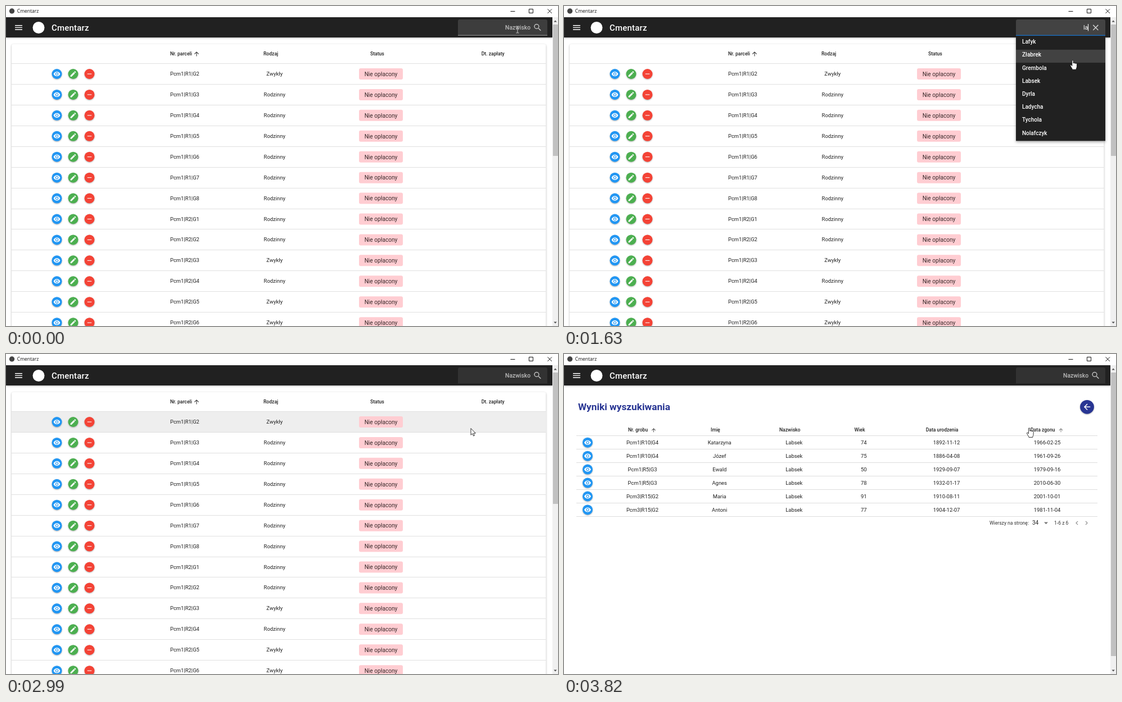
These frames come from a looping animation (982 by 570 pixels, 4430 ms). An HTML page:

```html
<!DOCTYPE html>
<html lang="pl">
<head>
<meta charset="utf-8">
<title>Cmentarz</title>
<style>
html, body { margin: 0; width: 100%; height: 100%; overflow: hidden; background: #fff; }
svg { display: block; }
text { font-family: Roboto, sans-serif; white-space: pre; }
.cell { font-size: 9.45px; fill: #212121; }
.head { font-size: 8.6px; font-weight: 500; fill: #212121; }
.chip { font-size: 10.15px; fill: #37292a; }
.item { font-size: 10px; font-weight: 500; fill: #fff; }
.foot { font-size: 8.6px; fill: #333; }
.lift { filter: drop-shadow(0 1.2px 1px rgba(0,0,0,.3)); }
</style>
</head>
<body>
<svg id="stage" width="982" height="570" viewBox="0 0 982 570"></svg>
<script>
const LOOP = 4430;
const stage = document.getElementById('stage');

const ICON = {
  eye: 'M12 9a3 3 0 1 0 0 6a3 3 0 1 0 0-6M12 17a5 5 0 1 1 0-10a5 5 0 1 1 0 10M12 4.5C7 4.5 2.73 7.61 1 12c1.73 4.39 6 7.5 11 7.5s9.27-3.11 11-7.5C21.27 7.61 17 4.5 12 4.5Z',
  pencil: 'M20.7 7c.4-.4.4-1 0-1.4l-2.3-2.3c-.4-.4-1-.4-1.4 0l-1.9 1.8l3.8 3.8M3 17.25V21h3.75L17.8 9.93l-3.75-3.75Z',
  minus: 'M5 11h14v2H5Z',
  search: 'M9.5 3a6.5 6.5 0 0 1 4.94 10.73l.27.27h.79l5 5l-1.5 1.5l-5-5v-.79l-.27-.27A6.5 6.5 0 1 1 9.5 3m0 2a4.5 4.5 0 1 0 0 9a4.5 4.5 0 1 0 0-9Z',
  close: 'M19 6.41L17.59 5L12 10.59L6.41 5L5 6.41L10.59 12L5 17.59L6.41 19L12 13.41L17.59 19L19 17.59L13.41 12Z',
  left: 'M20 11v2H8l5.5 5.5l-1.42 1.42L4.16 12l7.92-7.92L13.5 5.5L8 11Z',
  up: 'M13 20h-2V8l-5.5 5.5l-1.42-1.42L12 4.16l7.92 7.92l-1.42 1.42L13 8Z',
  menu: 'M3 6h18v2H3ZM3 11h18v2H3ZM3 16h18v2H3Z',
  down: 'M7 10l5 5l5-5Z',
  prev: 'M15.4 16.6L10.8 12l4.6-4.6L14 6l-6 6l6 6Z',
  next: 'M8.6 16.6L13.2 12L8.6 7.4L10 6l6 6l-6 6Z'
};

function el(parent, tag, attrs = {}, body) {
  const node = document.createElementNS('http://www.w3.org/2000/svg', tag);
  for (const k in attrs) node.setAttribute(k, attrs[k]);
  if (body !== undefined) node.textContent = body;
  parent.append(node);
  return node;
}
const set = (node, k, v) => node.setAttribute(k, v);
const show = (node, on) => set(node, 'visibility', on ? 'visible' : 'hidden');
const group = parent => el(parent, 'g');
const rect = (p, x, y, width, height, fill, rx = 0) => el(p, 'rect', { x, y, width, height, fill, rx });
const disc = (p, cx, cy, r, fill) => el(p, 'circle', { cx, cy, r, fill });
const line = (p, d, stroke, w = 1) => el(p, 'path', { d, stroke, 'stroke-width': w, fill: 'none' });
const text = (p, s, x, mid, cls, anchor = 'start', extra = {}) =>
  el(p, 'text', { x, y: mid, class: cls, 'text-anchor': anchor, ...extra }, s);
const icon = (p, name, cx, cy, size, fill) => el(p, 'path', {
  d: ICON[name], fill, 'fill-rule': 'evenodd',
  transform: `translate(${cx - size / 2} ${cy - size / 2}) scale(${size / 24})`
});
function button(p, name, cx, cy, fill, r = 9, size = 13) {
  set(disc(p, cx, cy, r, fill), 'class', 'lift');
  icon(p, name, cx, cy, size, '#fff');
}

rect(stage, 0, 0, 982, 570, '#fff');

// Plot table
const table = group(stage);
const card = rect(table, 10, 68, 950.5, 520, '#fff', 3);
card.style.filter = 'drop-shadow(0 1px 1.6px rgba(0,0,0,.32))';
const rowHover = rect(table, 10, 103, 950.5, 36.5, '#eee');
[['Nr. parceli', 292], ['Rodzaj', 458], ['Status', 648], ['Dt. zapłaty', 845.7]]
  .forEach(([s, x]) => text(table, s, x, 87.7, 'head'));
icon(table, 'up', 339, 85.3, 12.5, '#333');
const PITCH = 36.93, PLAIN = [0, 9, 11, 12];
for (let i = 0; i < 13; i++) {
  const y = 121 + PITCH * i;
  const plot = i < 7 ? `Pcm1|R1|G${i + 2}` : `Pcm1|R2|G${i - 6}`;
  rect(table, 10, Math.round(y - 19), 950.5, 1, '#e0e0e0');
  button(table, 'eye', 90.5, y, '#2196f3');
  button(table, 'pencil', 119.5, y, '#4caf50');
  button(table, 'minus', 148.5, y, '#f44336');
  text(table, plot, 292, y + 3, 'cell');
  text(table, PLAIN.includes(i) ? 'Zwykły' : 'Rodzinny', 477.8, y + 3, 'cell', 'middle');
  rect(table, 628, y - 10, 78, 20, '#ffcdd2', 3);
  text(table, 'Nie opłacony', 667, y + 3.8, 'chip', 'middle');
}

// Search results
const results = group(stage);
text(results, 'Wyniki wyszukiwania', 25, 100, '', 'start', { 'font-size': 17.25, 'font-weight': 700, fill: '#283593' });
button(results, 'left', 930.5, 94.3, '#283593', 12.4, 17.25);
[['Nr. grobu', 114], ['Imię', 261], ['Nazwisko', 383], ['Wiek', 516.5], ['Data urodzenia', 643.7], ['Data zgonu', 830]]
  .forEach(([s, x]) => text(results, s, x, 138.4, 'head'));
icon(results, 'up', 159.5, 135.8, 10.5, '#444');
icon(results, 'up', 884, 135.8, 10.5, '#777');
const FOUND = [
  'Pcm1|R10|G4 Katarzyna 74 1892-11-12 1966-02-25',
  'Pcm1|R10|G4 Józef 75 1886-04-08 1961-09-26',
  'Pcm1|R5|G3 Ewald 50 1929-09-07 1979-09-16',
  'Pcm1|R5|G3 Agnes 78 1932-01-17 2010-06-30',
  'Pcm3|R15|G2 Maria 91 1910-08-11 2001-10-01',
  'Pcm3|R15|G2 Antoni 77 1904-12-07 1981-11-04'
];
rect(results, 22, 145, 927, 1, '#ddd');
FOUND.forEach((row, i) => {
  const y = 157.7 + 23.95 * i;
  const cells = row.split(' ');
  cells.splice(2, 0, 'Labsek');
  rect(results, 22, Math.round(y + 11.6), 927, 1, '#ddd');
  button(results, 'eye', 42, y, '#2196f3');
  [139.5, 276.7, 409.3, 533.3, 680.6, 859.6].forEach((x, c) => text(results, cells[c], x, y + 3.2, 'cell', 'middle'));
});
text(results, 'Wierszy na stronę:', 757, 304, 'foot');
text(results, '34', 833, 304.3, 'cell', 'start', { style: 'font-size:10px' });
icon(results, 'down', 857.5, 301, 17, '#777');
text(results, '1-6 z 6', 872, 304, 'foot');
icon(results, 'prev', 912.5, 301, 14, '#888');
icon(results, 'next', 929.5, 301, 14, '#888');

// Window frame and app bar
rect(stage, 0, 0, 982, 20, '#fff');
disc(stage, 10.5, 9, 4.7, '#444');
text(stage, 'Cmentarz', 19.8, 12.3, '', 'start', { style: 'font:8.5px "Open Sans",sans-serif', fill: '#111' });
line(stage, 'M897.5 9.5h8M930.5 5.5h7v7h-7ZM963.5 5.5l7.5 7.5M971 5.5l-7.5 7.5', '#111');
const bar = rect(stage, 0, 20, 972, 36, '#212121');
bar.style.filter = 'drop-shadow(0 1px 1.5px rgba(0,0,0,.3))';
rect(stage, 0, 18, 982, 2, '#fff');
icon(stage, 'menu', 22.5, 38.4, 17.25, '#fff');
disc(stage, 58, 38.5, 10.5, '#fff');
text(stage, 'Cmentarz', 81, 43.7, '', 'start', { 'font-size': 15, 'font-weight': 500, 'letter-spacing': .18, fill: '#fff' });

rect(stage, 972, 20, 10, 550, '#f0f0f0');
const thumb = rect(stage, 973, 33, 9, 234, '#c1c1c1');
el(stage, 'path', { d: 'M974.5 28.5l2.7-3l2.7 3ZM974.5 562.5l2.7 3l2.7-3Z', fill: '#505050' });

// Search field
const field = el(stage, 'path', { d: 'M804 52.5V27a3 3 0 0 1 3-3h153a3 3 0 0 1 3 3v25.5Z' });
const rule = rect(stage, 804, 51.7, 159, 1, '#999');
const label = text(stage, 'Nazwisko', 933, 41.6, '', 'end', { 'font-size': 10.3, 'font-weight': 500, fill: '#bcbcbc' });
const lens = icon(stage, 'search', 945.8, 38.2, 17.25, '#c4c4c4');
const clear = icon(stage, 'close', 945.8, 38.4, 17.25, '#d0d0d0');
const typed = text(stage, '', 932.3, 41.8, '', 'end', { 'font-size': 10.6, fill: '#fff' });
const caret = rect(stage, 932, 32, 1, 12.5, '#fff');

// Suggestions
const STEP = 23.2;
const NAMES = ('Trobelt Nebych Porgal Wentorylski Lafyk Złabrek Torrny Grembola Fyrzka Dromiczek Śmorzka Źrebiuta ' +
  'Gabny Labsek Dehlyk Fomeczka Gybreczek Turiczek Gelwig Temus Dochryk Dyrla Ladycha Tychola Nolafczyk').split(' ');
const MATCHES = NAMES.filter(s => /la|ła/i.test(s));
function menu(names, height) {
  const g = group(stage);
  const box = rect(g, 804, 53, 159, height, '#212121');
  box.style.filter = 'drop-shadow(0 2px 2.5px rgba(0,0,0,.35))';
  const mark = rect(g, 804, 54.6, 159, STEP, '#424242');
  names.forEach((s, i) => text(g, s, 815, 67.2 + STEP * i, 'item'));
  return { g, mark };
}
const full = menu(NAMES.slice(0, 23), 540);
const short = menu(MATCHES, 187.3);
show(full.mark, false);

// Pointers, each with its tip at the origin
const beam = line(stage, 'M-2.5-6h2l.5.6l.5-.6h2M0-5.4V5.4M-2.5 6h2l.5-.6l.5.6h2', '#ddd', .9);
const arrow = el(stage, 'path', { d: 'M0 0v11.8l2.7-2.5l1.9 4.2l1.9-.8l-1.8-4.1h3.7Z', fill: '#fff', stroke: '#000', 'stroke-width': .8 });
const hand = el(stage, 'path', {
  d: 'M-1.2 1a1.2 1.2 0 0 1 2.4 0V5.2a1.1 1.1 0 0 1 2.2.3a1.1 1.1 0 0 1 2.1.5a1 1 0 0 1 2 .6V11c0 2-1.2 3-1.4 5.4H-.6C-1 14-3.6 11.5-4.2 9.3c-.3-1.2 1.2-1.9 2-.8l1 1.4Z',
  fill: '#fff', stroke: '#000', 'stroke-width': .8
});

// Moments of change: start, end, count
const TICKS = [[0, 0, 1], [70, 70, 1], [260, 260, 1], [440, 610, 3], [770, 830, 2], [1020, 1020, 1], [1220, 1700, 8],
  [1760, 2240, 7], [2300, 2760, 7], [2880, 2990, 2], [3200, 3400, 4], [3560, 3820, 5]]
  .flatMap(([a, b, n]) => Array.from({ length: n }, (_, i) => a + (n > 1 ? (b - a) * i / (n - 1) : 0)));

function track(keys, t) {
  const j = keys.findIndex(k => k[0] > t);
  if (j === 0) return keys[0].slice(1);
  if (j < 0) return keys[keys.length - 1].slice(1);
  const a = keys[j - 1], b = keys[j], f = (t - a[0]) / (b[0] - a[0]);
  return a.slice(1).map((v, i) => v + (b[i + 1] - v) * f);
}
const HAND = [[1150, 925, 73.3], [1630, 901.7, 100.6], [1700, 899, 102.5], [2240, 862, 132], [2420, 845, 144], [2760, 827.6, 132]];
const TABLE_FADE = [[3140, 1], [3200, .7], [3260, .37], [3340, .12], [3400, 0]];
const RESULT_FADE = [[3490, 0], [3560, .2], [3625, .48], [3690, .74], [3755, .92], [3820, 1]];
const MENU_FADE = [[380, 0], [440, .4], [525, .8], [610, 1]];
const within = (t, a, b) => t >= a && t < b;

function draw(now) {
  const time = now % LOOP;
  const t = TICKS.filter(k => k <= time).pop();
  const focus = within(t, 260, 2880);
  const text = within(t, 440, 2990);
  const isArrow = within(t, 2990, 3560);

  set(field, 'fill', t < 260 ? '#3d3d3d' : focus ? '#434343' : '#323232');
  show(rule, t < 2880);
  set(rule, 'fill', focus ? '#1976d2' : '#999');
  set(rule, 'height', focus ? 1.4 : 1);
  show(label, !text);
  show(lens, !text);
  show(clear, text);
  typed.textContent = !text ? '' : t < 770 ? 'l' : 'la';
  show(caret, within(t, 70, 2880) && !within(t, 1020, 1490) && !within(t, 2000, 2520));

  set(full.g, 'opacity', within(t, 440, 770) ? track(MENU_FADE, t)[0] : 0);
  set(short.g, 'opacity', within(t, 770, 2990) ? 1 : 0);
  const [x, y] = track(HAND, t);
  set(short.mark, 'y', 54.6 + STEP * Math.floor((y - 54.6) / STEP));
  set(short.mark, 'fill', t < 830 ? '#323232' : t < 2880 ? '#424242' : '#535353');

  set(table, 'opacity', track(TABLE_FADE, t)[0]);
  set(results, 'opacity', track(RESULT_FADE, t)[0]);
  show(rowHover, isArrow);
  set(thumb, 'height', t < 3560 ? 234 : 505);

  show(beam, t < 440);
  set(beam, 'transform', `translate(910 ${t < 260 ? 42 : 56})`);
  show(arrow, isArrow);
  set(arrow, 'transform', 'translate(827 132.5)');
  show(hand, t >= 440 && !isArrow);
  set(hand, 'transform', `translate(${x} ${y})`);
}

const start = performance.now();
(function tick() {
  draw(performance.now() - start);
  requestAnimationFrame(tick);
})();
</script>
</body>
</html>
```
